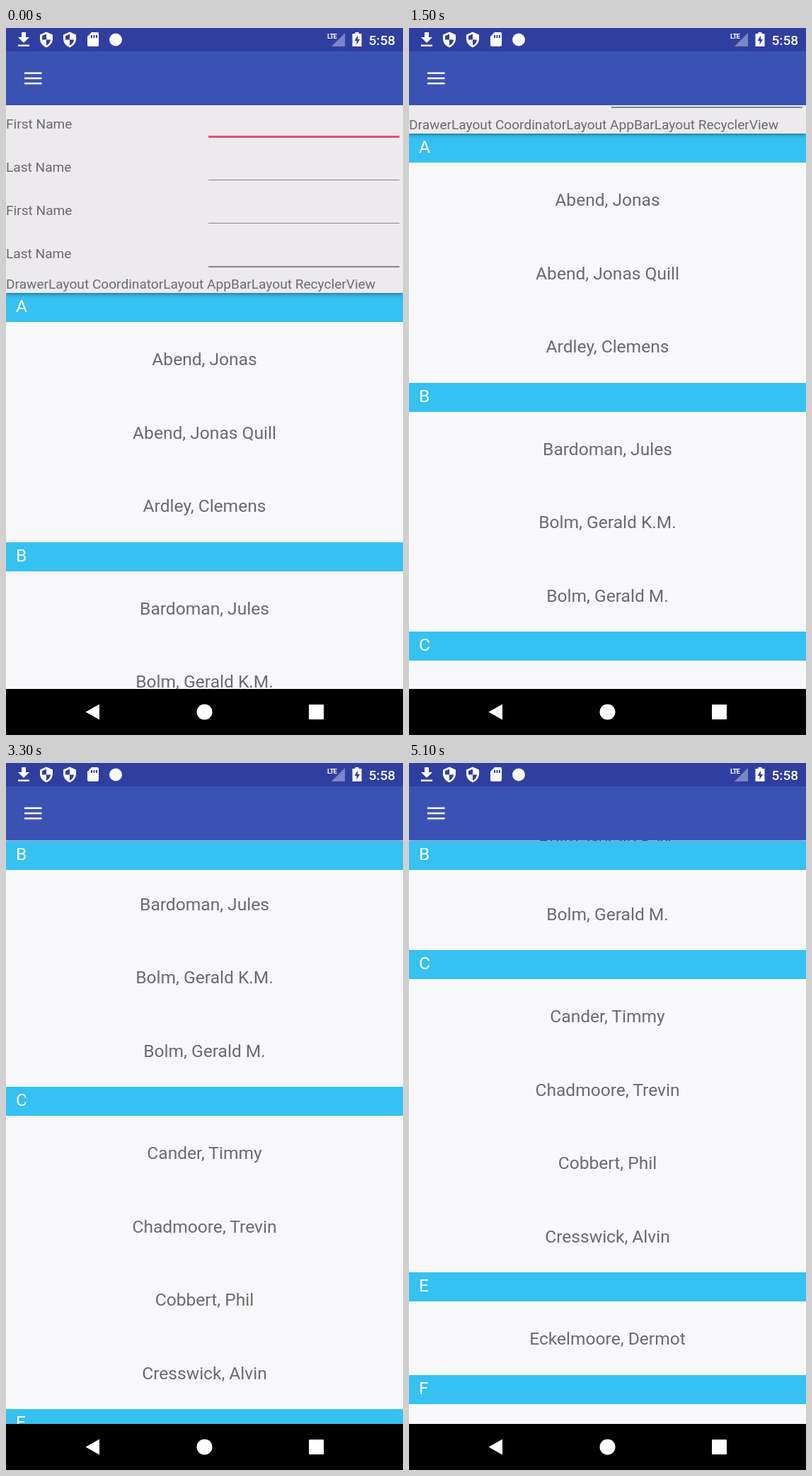
An HTML page for the animation above (5600 ms loop, 561 px wide and 998 px high).

```html
<!DOCTYPE html>
<html lang="en">
<head>
<meta charset="utf-8">
<title>Sectioned list</title>
<style>
  html, body { margin: 0; width: 100%; height: 100%; overflow: hidden; }
  body { position: relative; background: #f8f7fa; color: #6b6a6d; font: 24.57px Roboto, sans-serif; }
  #pane { position: absolute; top: 109px; left: 0; width: 561px; height: 824px; overflow: hidden; }
  #form {
    position: relative; z-index: 2; height: 265px; background: #eceaed;
    font-size: 19.11px; box-shadow: 0 2px 5px rgba(0, 0, 0, .38);
  }
  #form div { position: absolute; left: 0; white-space: nowrap; line-height: 24px; }
  #form i { position: absolute; left: 286px; width: 270px; height: 1.5px; background: #858487; }
  #form i.focus { height: 3px; background: #f5457f; }
  section { position: relative; }
  h2 {
    position: sticky; top: 0; z-index: 1; box-sizing: border-box; height: 41px; margin: 0;
    padding-left: 14px; background: #35c1f1; color: #fff; font: inherit; line-height: 37px;
  }
  p { box-sizing: border-box; height: 103.5px; margin: 0; padding-top: 3px; line-height: 100.5px; text-align: center; }
  #bar {
    position: absolute; top: 0; left: 0; width: 561px; height: 109px;
    background: linear-gradient(#303f9f 33px, #3b52b5 33px); box-shadow: 0 2px 6px rgba(0, 0, 0, .42);
  }
  #nav { position: absolute; top: 933px; left: 0; width: 561px; height: 65px; background: #000; }
  svg { display: block; fill: #fff; }
</style>
</head>
<body>
<div id="pane">
  <div id="form"></div>
</div>

<div id="bar">
  <svg width="561" height="109">
    <defs>
      <g id="shield">
        <path d="M0-11 9-7V-1C9 4 5 9 0 11-5 9-9 4-9-1V-7Z"/>
        <path fill="#303f9f" d="M0-8V0H-6V-5.300ZM0 0H6C5.500 4 3 7 0 8Z"/>
      </g>
    </defs>
    <path d="M22 6h6v7h5l-8 8-8-8h5ZM17 23.500h16v2.500h-16Z"/>
    <use href="#shield" x="57" y="16.500"/>
    <use href="#shield" x="90" y="16.500"/>
    <path fill-rule="evenodd" d="M121 6h8q2 0 2 2v16q0 2-2 2h-12q-2 0-2-2V12ZM120 10v4h2v-4ZM123.500 10v4h2v-4ZM127 10v4h2v-4Z"/>
    <circle cx="155" cy="16.500" r="9"/>
    <text x="454" y="15" font-size="9.500" font-weight="700" letter-spacing="-.8">LTE</text>
    <path fill="#7b86c4" d="M479 7v19h-19Z"/>
    <path fill-rule="evenodd" d="M493.500 8V6h5v2h4v18h-13V8ZM497 10.500l-4.500 7.500h3v5.500l4.500-7.500h-3Z"/>
    <text x="512.500" y="23.800" font-size="19.110" font-weight="500">5:58</text>
    <path d="M26 62.500h24.500v2.400H26ZM26 69.800h24.500v2.400H26ZM26 77.100h24.500v2.400H26Z"/>
  </svg>
</div>

<div id="nav">
  <svg width="561" height="65">
    <path d="M132 21.500v22L112.500 32.500Z"/>
    <circle cx="280.500" cy="32.500" r="11"/>
    <rect x="428" y="22" width="21" height="21" rx="1"/>
  </svg>
</div>

<script>
const LOOP = 5600;
const sections = {
  A: ['Abend, Jonas', 'Abend, Jonas Quill', 'Ardley, Clemens'],
  B: ['Bardoman, Jules', 'Bolm, Gerald K.M.', 'Bolm, Gerald M.'],
  C: ['Cander, Timmy', 'Chadmoore, Trevin', 'Cobbert, Phil', 'Cresswick, Alvin'],
  E: ['Eckelmoore, Dermot'],
  F: ['Fennick, Morris']
};

const steps = [
  [0, 0], [300, 62], [400, 108], [500, 117],
  [1500, 225], [1600, 228], [1700, 229],
  [3200, 380], [3300, 620], [3400, 709.5],
  [3700, 765], [3800, 810], [4000, 813]
];

const pane = document.getElementById('pane');
const form = document.getElementById('form');

function add(parent, tag, text = '') {
  const el = document.createElement(tag);
  el.textContent = text;
  return parent.appendChild(el);
}

for (let i = 0; i < 4; i++) {
  const y = 61.3 * i;
  add(form, 'div', i % 2 ? 'Last Name' : 'First Name').style.top = 14.5 + y + 'px';
  const line = add(form, 'i');
  line.style.top = (i ? 43.3 : 42.5) + y + 'px';
  if (!i) line.className = 'focus';
}
add(form, 'div', 'DrawerLayout CoordinatorLayout AppBarLayout RecyclerView').style.top = '241px';

for (const [letter, names] of Object.entries(sections)) {
  const section = add(pane, 'section');
  add(section, 'h2', letter);
  names.forEach(name => add(section, 'p', name));
}

function draw() {
  const t = performance.now() % LOOP;
  pane.scrollTop = steps.findLast(([start]) => start <= t)[1];
  requestAnimationFrame(draw);
}
draw();
</script>
</body>
</html>
```
